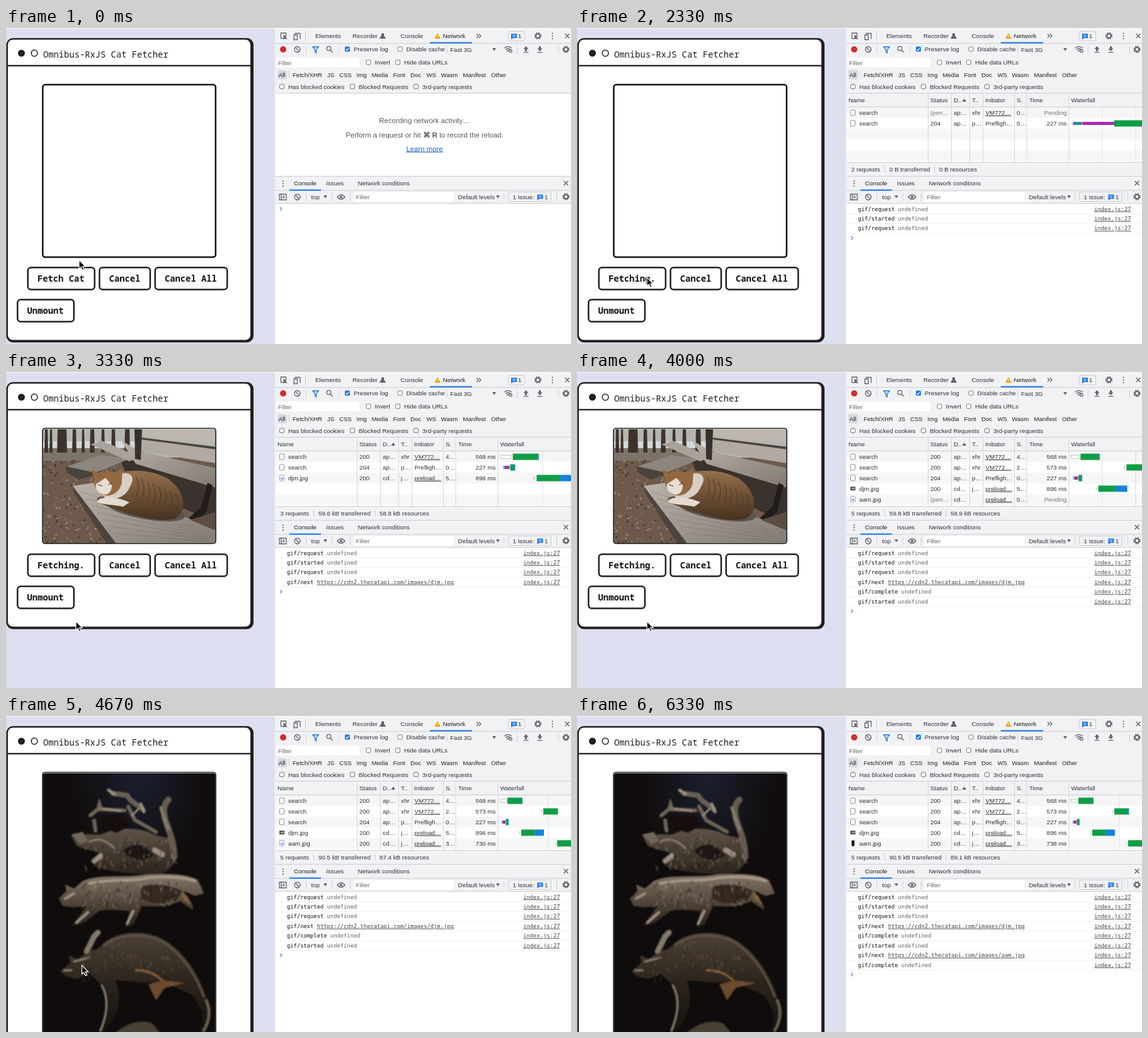
Write an HTML page that moves like this. It is 897x502 px and loops after 6.49 s.

```html
<!DOCTYPE html>
<html lang="en">
<head>
<meta charset="utf-8">
<title>Cat Fetcher</title>
<style>
html, body { margin: 0; width: 100%; height: 100%; overflow: hidden; background: #fff; }
svg { display: block; }
text { font-family: "Liberation Sans", Arial, sans-serif; font-size: 9.75px; fill: #303338; white-space: pre; }
.app { font-family: "Noto Sans Mono", "DejaVu Sans Mono", monospace; font-size: 13.8px; font-weight: 500; fill: #1d1d1d; }
.btn { font-weight: 700; fill: #111; }
.log { font-family: "DejaVu Sans Mono", monospace; font-size: 8.8px; fill: #111; }
.big { font-size: 11.4px; fill: #54575b; }
.ico { fill: none; stroke: #5f6368; stroke-width: 1.3; }
.u { text-decoration: underline; }
</style>
</head>
<body>
<svg id="stage" width="897" height="502" viewBox="0 0 897 502">
  <defs>
    <clipPath id="wide"><rect x="59" y="91" width="273" height="181" rx="3"/></clipPath>
    <clipPath id="tall"><rect x="59" y="91" width="273" height="420" rx="3"/></clipPath>
    <filter id="soft"><feGaussianBlur stdDeviation="1.1"/></filter>
    <filter id="glow"><feGaussianBlur stdDeviation="4"/></filter>
    <linearGradient id="wood" x1="0" y1="0" x2="1" y2="1"><stop stop-color="#b9b3ab"/><stop offset="1" stop-color="#817a73"/></linearGradient>
    <linearGradient id="coat" x1="0" y1="0" x2="0" y2="1"><stop stop-color="#94704c"/><stop offset="1" stop-color="#46311f"/></linearGradient>
    <linearGradient id="fur" x1="0" y1="0" x2="0" y2="1"><stop stop-color="#5f5447"/><stop offset="1" stop-color="#2c241d"/></linearGradient>
    <linearGradient id="lit" x1="0" y1="0" x2="0" y2="1"><stop stop-color="#85786a"/><stop offset=".5" stop-color="#54483c"/><stop offset="1" stop-color="#271f19"/></linearGradient>
    <linearGradient id="dim" x1="0" y1="0" x2="0" y2="1"><stop stop-color="#4d4237"/><stop offset=".5" stop-color="#2c241d"/><stop offset="1" stop-color="#17110d"/></linearGradient>
    <radialGradient id="night" cx=".55" cy=".02" r=".4"><stop stop-color="#1b1e2e"/><stop offset="1" stop-color="#100c0b"/></radialGradient>
  </defs>
  <g id="page"></g>
  <g id="tools"></g>
  <g id="net"></g>
  <g id="logs"></g>
  <g id="mouse"></g>
</svg>
<script>
const LOOP = 6490, FPS = 6;
const $ = id => document.getElementById(id);

const rect = (x, y, w, h, fill, more = '') =>
  `<rect x="${x}" y="${y}" width="${w}" height="${h}" fill="${fill}" ${more}/>`;
const path = (d, fill = 'none', more = '') => `<path d="${d}" fill="${fill}" ${more}/>`;
const line = (d, color, w) => path(d, 'none', `stroke="${color}" stroke-width="${w}" stroke-linecap="round"`);
const icon = d => `<path class="ico" d="${d}"/>`;
const disc = (x, y, r, fill, more = '') => `<circle cx="${x}" cy="${y}" r="${r}" fill="${fill}" ${more}/>`;
const oval = (x, y, rx, ry, fill, turn = 0) =>
  `<ellipse cx="${x}" cy="${y}" rx="${rx}" ry="${ry}" fill="${fill}" transform="rotate(${turn} ${x} ${y})"/>`;
// y is the vertical middle of the line
const text = (x, y, s, more = '') => `<text x="${x}" y="${y + 3.5}" ${more}>${s}</text>`;
const vline = (x, y, h, c = '#cbced3') => rect(x, y, 1, h, c);
const hline = (y, c = '#cbced3', x = 427) => rect(x, y, 897 - x, 1, c);

function random(seed) {
  return () => (seed = (seed * 16807) % 2147483647) / 2147483647;
}

// ---- pictures
function benchCat() {
  const rnd = random(41);
  let s = rect(58, 90, 276, 184, '#6d5a4c') + rect(58, 90, 276, 46, '#b5b6b0') +
    rect(58, 110, 160, 12, '#d3d8d8') + rect(58, 121, 160, 20, '#7d7469');
  for (const [x, w] of [[62, 4], [70, 3], [82, 14], [106, 5], [121, 3], [134, 6], [152, 4], [168, 5], [189, 7]])
    s += path(`M${x} 90h${w}l1 38h${-w - 2}z`, '#3d332c');
  for (let i = 0; i < 150; i++) {
    const x = 58 + rnd() * 120, y = 138 + rnd() * 135;
    s += oval(x.toFixed(1), y.toFixed(1), 2.4, 1.1, ['#a08a78', '#463930', '#8a7260'][i % 3], i * 37 % 180);
  }
  s += path('M180 136L334 170V240L276 214L190 160Z', '#3a322d') +
    path('M94 150L140 146L152 160L116 171L97 160Z', '#4a433e') +
    path('M96 150L150 132L196 138L142 160Z', '#8d867f') +
    path('M134 115L152 109L210 134L196 142Z', '#aaa39b') +
    path('M216 90H334V113L218 101Z', '#bdb7af') +
    path('M214 105L334 122V145L209 125Z', '#b0aaa2') +
    path('M182 108L212 126L334 153V184L206 146Z', 'url(#wood)') +
    path('M204 90L216 90L214 140L205 138Z', '#37302c') +
    path('M214 104L334 119V123L214 107Z', '#4b433e') +
    path('M320 176L328 180L318 222L300 240L286 236L310 214Z', '#211d1b') +
    path('M106 181L140 176L334 249V274H176Z', 'url(#wood)') +
    path('M106 182L176 274H160L108 192Z', '#4d443e') +
    path('M292 235L334 222V252Z', '#5b4d42');
  for (let i = 0; i < 7; i++)
    s += path(`M${118 + i * 9} ${190 + i * 11}L${300 + i * 4} ${246 + i * 4}`, 'none', 'stroke="#6f6861" stroke-width=".7" opacity=".6"');
  s += oval(222, 219, 63, 15, '#5c544d', 10) +
    path('M165 166C190 152 232 154 258 170C284 188 290 222 268 233C240 241 188 224 148 208C140 202 146 197 158 198Z', 'url(#coat)') +
    path('M178 162C196 158 208 164 196 184C190 198 174 204 158 202L152 190Z', '#d8cec1') +
    path('M144 206C150 196 176 198 196 207L186 214C170 210 154 212 144 206Z', '#e3dad0') +
    path('M135 154L146 160C156 156 166 157 172 160L185 153L184 172C184 188 170 198 158 196C146 194 138 182 140 170Z', '#94683f') +
    path('M158 168L168 180C168 192 160 197 153 194C144 191 141 184 143 178Z', '#e6ddd3') +
    path('M146 179l7 2M162 179l7-3', 'none', 'stroke="#3b2a1d"');
  for (let i = 0; i < 8; i++)
    s += path(`M${206 + i * 9} ${166 + i * 4}q8 14 0 ${34 - i}`, 'none', 'stroke="#473220" stroke-width="2" opacity=".45"');
  return `<g clip-path="url(#wide)">${s}</g>`;
}

function stackedCats() {
  const rnd = random(7), BLACK = '#120e0c', PALE = '#9c8f7f';
  // upper cat on its back: body, legs in the air, tail, head
  let s = path('M116 192C126 184 140 190 152 188C176 176 206 178 226 184C244 194 258 192 266 196C274 222 268 244 248 250C214 252 168 250 140 238C134 226 150 222 160 224C146 214 122 212 112 206L103 188Z', 'url(#fur)') +
    line('M258 133C248 142 249 156 256 174C262 190 267 204 267 224', '#655a4e', 10) +
    line('M246 146C249 156 253 168 258 180', '#857a6c', 5) +
    line('M170 123L192 126L198 134L217 148', '#6b6053', 8) + line('M163 118L172 124M214 140L219 152', PALE, 5) +
    line('M134 158L146 148L188 150M142 182L140 166M206 166L238 184M194 144L204 164', '#6f6456', 6) +
    line('M148 146L182 151M200 158L210 148', PALE, 3) +
    path('M146 160L188 158L198 174L176 186L148 176Z', BLACK) +
    path('M186 214C204 196 226 206 234 222C220 232 200 232 186 214Z', '#1f1813') +
    path('M148 130L154 148L144 146ZM104 188L122 184L130 198L118 204Z', '#71665a') +
    line('M236 213L248 220M140 230L150 222', PALE, 8) + line('M132 200C146 192 160 198 172 210', '#857969', 3);
  // middle cat, lit from above
  s += path('M84 290L96 278L94 268L108 274L122 262C150 250 190 258 220 252C260 250 284 250 304 260L310 272L314 282L300 286L282 278C288 290 300 300 296 308L276 294C262 302 240 304 216 302L202 332L190 336L196 310C176 308 160 306 148 310L122 330L104 334L116 318L128 302L106 304L90 302Z', 'url(#lit)') +
    line('M132 266C170 258 200 264 226 257C256 254 280 256 300 262', '#a59887', 4) +
    line('M94 290L108 282M112 328L130 312M192 330L202 310', PALE, 4) +
    path('M214 272C236 264 262 268 280 278L270 294C250 300 226 298 214 290Z', '#362c23') +
    path('M278 280l10 6l6 14l-12-8z', '#83603a');
  // lower cat, mostly in shadow
  s += line('M128 374L140 350L146 344', '#82776a', 9) +
    path('M86 406L102 392L100 380L114 386C126 374 140 376 152 364C172 342 224 336 258 360C286 380 306 410 318 444C330 466 328 488 314 502H304C320 484 310 462 296 444C278 434 258 428 248 420C222 428 196 420 174 420C186 452 178 476 156 502H146C162 470 160 444 148 424L134 410L112 418L96 414Z', 'url(#dim)') +
    line('M156 364C182 344 226 344 254 362C284 384 302 412 314 446', '#5f5345', 3) +
    line('M108 390L132 384M92 404L104 404M152 428C164 450 160 474 150 500', '#867a6b', 3) +
    line('M206 404C228 404 240 412 250 422', '#8a6038', 3) +
    path('M226 426L250 420L284 424L252 432L238 452Z', '#6b4b2f') +
    line('M318 452C326 470 322 486 314 500', '#6d6152', 4) +
    path('M166 510C184 492 208 480 232 488L250 510Z', '#4a4036');
  let hair = '';
  for (let i = 0; i < 260; i++) {
    const band = i % 3, u = rnd(), x = 122 + u * 150;
    const y = [192, 260, 356][band] + rnd() * [50, 40, 46][band] + (band === 2 ? 90 * (u - .45) ** 2 : 0);
    hair += path(`M${x.toFixed(1)} ${y.toFixed(1)}l${(rnd() * 8 - 4).toFixed(1)} 6`, 'none',
      `stroke="${i % 2 ? '#a39685' : BLACK}" stroke-width="1.8" opacity="${[.4, .45, .22][band]}"`);
  }
  return `<g clip-path="url(#tall)">${rect(58, 90, 276, 420, 'url(#night)')}<g filter="url(#soft)">${s}${hair}</g></g>`;
}

const pictures = ['', benchCat(), stackedCats()];

// ---- left side
const INK = '#231f20';
function button(x, y, w, s) {
  return rect(x, y, w, 35, '#fff', `rx="5" stroke="${INK}" stroke-width="2.5"`) +
    `<text class="app btn" x="${x + 15.3}" y="${y + 22}">${s}</text>`;
}

function drawPage(pic, busy) {
  const boxH = [274, 183, 470][pic], dy = boxH - 274;
  let s = rect(0, 0, 427, 502, '#dcdff0') + rect(0, 0, 427, 1, '#fff') +
    rect(.5, 16, 392.5, 483.5 + dy, INK, 'rx="11"') +
    rect(3, 18.5, 385, 477 + dy, '#fff', 'rx="8"') +
    rect(2, 58.7, 386, 2.3, INK) +
    disc(24.5, 40, 5.5, INK) + disc(45, 40, 5, '#fff', `stroke="${INK}" stroke-width="1.4"`) +
    `<text class="app" x="59" y="46.5">Omnibus-RxJS Cat Fetcher</text>`;
  s += pic
    ? rect(58, 89.5, 275, boxH, '#fff', 'rx="4" stroke="#111" stroke-width="1.6"') + pictures[pic]
    : rect(58.3, 90, 274.5, boxH, '#fff', 'rx="4" stroke="#111" stroke-width="2.5"');
  if (pic < 2) {
    const y = 380.5 + dy;
    s += button(34.7, y, 106, busy ? 'Fetching.' : 'Fetch Cat') + button(148.4, y, 80.5, 'Cancel') +
      button(236.7, y, 114.5, 'Cancel All') + button(18.3, y + 51, 89.5, 'Unmount');
  }
  return s;
}

// ---- devtools chrome
const box = (x, y, on) => on
  ? rect(x - 4, y - 4, 8, 8, '#1a73e8', 'rx="1.5"') + path(`M${x - 2.3} ${y}l1.7 2l3-4`, 'none', 'stroke="#fff" stroke-width="1.2"')
  : rect(x - 3.5, y - 3.5, 7, 7, '#fff', 'rx="1.5" stroke="#767676" stroke-width="1"');
const check = (x, y, s, on) => box(x, y, on) + text(x + 10, y, s);
const gear = (x, y) => disc(x, y, 3.3, 'none', 'stroke="#5f6368" stroke-width="2"') +
  disc(x, y, 4.9, 'none', 'stroke="#5f6368" stroke-width="1.6" stroke-dasharray="2.1 1.75"');
const cross = (x, y) => icon(`M${x - 3.5} ${y - 3.5}l7 7m0-7l-7 7`);
const dots = (x, y) => [-4, 0, 4].map(d => disc(x, y + d, 1.1, '#5f6368')).join('');
const ban = (x, y) => disc(x, y, 4.5, 'none', 'stroke="#5f6368" stroke-width="1.3"') + icon(`M${x - 3} ${y - 3}l6 6`);
const bubble = (x, y) => path(`M${x - 4.5} ${y - 4}h9v7h-6l-3 2.5z`, '#1a73e8') +
  path(`M${x - 2.5} ${y - 1.8}h5m-5 2.4h5`, 'none', 'stroke="#fff" stroke-width=".9"');
const drop = (x, y) => path(`M${x - 3} ${y - 2}h6l-3 4.6z`, '#5f6368');
const field = (x, y, w) => rect(x, y, w, 15.5, '#fff') + text(x + 3, y + 8, 'Filter', 'style="fill:#62666a"');
const frame = (x, y, w, h) => rect(x, y, w, h, 'none', 'rx="2" stroke="#cbced3"');

function drawTools() {
  const BAR = '#f0f2f4';
  let s = rect(426.5, 0, 470.5, 502, '#fff') + rect(427, 1, 470, 103, BAR) + hline(24) + hline(103) +
    icon('M444 16.5h-7.5v-8.5h8v4') + path('M440 11l6.5 2.5l-2.8 1l2.6 2.6l-1.2 1.2l-2.6-2.6l-1.1 2.6z', '#5f6368') +
    icon('M459 8.5h8v9M457 11h5.5v7.5h-5.5zM459 11v-2.5') + vline(475, 6, 14) +
    text(491, 12.5, 'Elements') + text(550, 12.5, 'Recorder') + text(626.5, 12.5, 'Console') + text(693.5, 12.5, 'Network', 'style="fill:#202124"') +
    path('M596 8.5h4v3l3 5.5h-10l3-5.5z', '#5f6368') +
    path('M685 8.5l4.8 8.5h-9.6z', '#f2a600') + rect(684.6, 11.5, 1, 3, '#fff') +
    rect(673, 22.5, 67, 2, '#1a73e8') +
    icon('M747 9.5l3 3l-3 3m4-6l3 3l-3 3') +
    frame(797.5, 5.5, 26, 15) + bubble(806.5, 13) + text(813, 12.5, '1') +
    gear(844.5, 12.5) + dots(867.5, 12.5) + cross(891, 12.5);

  s += disc(440, 34, 5, '#d32f2f') + ban(462.5, 34) + vline(476, 28, 13) +
    path('M487 30h9l-3.5 4.5v5l-2-1.5v-3.5z', 'none', 'stroke="#1a73e8" stroke-width="1.3"') +
    disc(512.5, 32.5, 3.3, 'none', 'stroke="#5f6368" stroke-width="1.3"') + icon('M515 35l4 4') + vline(528, 28, 13) +
    check(542, 33.5, 'Preserve log', true) + check(625.5, 33.5, 'Disable cache') + vline(699.5, 28, 13) +
    text(705, 34, 'Fast 3G') + drop(775, 34) +
    icon('M791 32q6-5 12 0m-10 2.5q4-3.5 8 0m-6 2.5q2-2 3 0') + disc(801, 36.5, 2.2, BAR, 'stroke="#5f6368" stroke-width="1.3"') + vline(811, 28, 13) +
    path('M825.5 29l4 4.5h-2.5v3.5h-3v-3.5h-2.5zM821.5 38h8v1.2h-8z', '#5f6368') +
    path('M847.5 37l4-4.5h-2.5v-3.5h-3v3.5h-2.5zM843.5 38h8v1.2h-8z', '#5f6368') + vline(877, 28, 13) + gear(889, 34);

  s += field(429, 47, 132) + check(575.5, 54.5, 'Invert') + check(622, 54.5, 'Hide data URLs');
  s += rect(431, 67, 15, 14.5, '#d5d8dc', 'rx="3"') + vline(449, 68, 12);
  const kinds = { All: 432.5, 'Fetch/XHR': 455, JS: 510, CSS: 529, Img: 556.5, Media: 580.5, Font: 614.5, Doc: 642, WS: 667.5, Wasm: 690.5, Manifest: 725.5, Other: 770 };
  for (const k in kinds) s += text(kinds[k], 74, k, 'style="font-size:9.6px;fill:#202124"');
  s += check(438, 93, 'Has blocked cookies') + check(550, 93, 'Blocked Requests') + check(651, 93, '3rd-party requests');

  s += rect(427, 235, 470, 43, BAR) + hline(235) + hline(257.5) + hline(278) +
    dots(440, 247) + text(457, 246.5, 'Console', 'style="fill:#202124"') + rect(450, 256.5, 50, 2, '#1a73e8') +
    text(508, 246.5, 'Issues') + text(558.5, 246.5, 'Network conditions') + cross(889, 246.5) +
    icon('M434 264h11v9h-11zM437 264v9') + path('M439.5 266l3.5 2.5l-3.5 2.5z', '#5f6368') + ban(462.5, 268.5) + vline(476, 262, 13) +
    text(484.5, 268, 'top') + drop(507, 268) + vline(517, 262, 13) +
    icon('M526 268.5q6-7 12 0q-6 7-12 0z') + disc(532, 268.5, 2, '#5f6368') + vline(546, 262, 13) +
    field(552.5, 260.5, 158) + text(717.5, 268, 'Default levels') + drop(781, 268) + vline(790, 262, 13) +
    frame(797.5, 260.5, 68, 15) + text(804.5, 268, '1 Issue:') + bubble(848, 268.5) + text(855, 268, '1') +
    vline(874, 262, 13) + gear(889, 268) + vline(426.5, 1, 501, '#e2e4e9');
  return s;
}

// ---- network table
const COLS = [557, 594, 623, 644, 694, 713.5, 780.5];
const TEAL = '#2a8f8f', GREEN = '#0f9d45', BLUE = '#1583d8', PURPLE = '#a52bb5', GREY = '#c4c4c4';
const zoomKeys = [[15, 3.6], [17, 2.4], [20, 1.72], [24, 1.28], [28, 1]];

function zoom(n) {
  if (n >= 28) return 1;
  for (let i = 1; i < zoomKeys.length; i++) {
    const [a, p] = zoomKeys[i - 1], [b, q] = zoomKeys[i];
    if (n <= b) return p + (q - p) * Math.max(0, n - a) / (b - a);
  }
}

// bar segments: from, to, colour, height
const bars = {
  first: [[0, 11, 'wait', 5], [12, 35, GREEN, 10], [35, 36, BLUE, 10]],
  second: [[66, 67.2, GREY, 5], [69, 91, GREEN, 10], [91, 92.4, BLUE, 10]],
  check: [[2.6, 3.4, GREY, 5], [3.6, 4.4, TEAL, 5], [4.4, 9, PURPLE, 5], [9.6, 13.4, GREEN, 10], [13.4, 14.2, BLUE, 10]],
  djm: [[31, 32.2, GREY, 5], [34, 55.3, GREEN, 10], [55.3, 70, BLUE, 10]],
  aam: [[88, 89.2, GREY, 5], [91, 116, GREEN, 10]],
  early: [[1.4, 2.4, GREY, 5], [3.5, 17, TEAL, 5], [17, 18.5, '#e08a1e', 5], [18.5, 69, PURPLE, 5], [69, 114, GREEN, 10]]
};
const drawBars = (name, y, k) => (bars[name] || []).map(([a, b, c, h]) => {
  const x = 784 + a * k, w = Math.min(897, 784 + b * k) - x;
  if (w <= 0) return '';
  return c === 'wait' ? rect(x + .5, y - 2.5, w - 1, h, '#fff', 'stroke="#c8c8c8"') : rect(x, y - h / 2, w, h, c);
}).join('');

function fileIcon(kind, y) {
  if (kind === 'djm') return rect(434, y - 3, 8, 6, '#5a5048') + rect(436, y - 1, 5, 2, '#b3a696');
  if (kind === 'aam') return rect(436, y - 4.5, 4.5, 9, '#17120f');
  const img = kind === 'img';
  return rect(434.5, y - 4.5, 7, 9, '#fff', `rx="1" stroke="${img ? '#9aa4c8' : '#8b8f94'}"`) +
    (img ? rect(436, y - .5, 4, 3, '#8aa0d8') : '');
}

// each row: icon, name, status, domain, type, initiator, size, time, bar
function rowsAt(n) {
  const pending = (ico, name, domain, type, init) => [ico, name, '(pen…', domain, type, init, '0…', 'Pending', ''];
  const search = ['doc', 'search', 'ap…', 'xhr', 'VM772…'];
  const rows = [n < 15 ? pending(...search)
    : ['doc', 'search', 200, 'ap…', 'xhr', 'VM772…', '4…', '568 ms', 'first']];
  if (n >= 21) rows.push(n < 24 ? pending(...search)
    : ['doc', 'search', 200, 'ap…', 'xhr', 'VM772…', '2…', '573 ms', 'second']);
  rows.push(n < 12 ? pending('doc', 'search', 'ap…', 'p…', 'Prefligh…')
    : ['doc', 'search', 204, 'ap…', 'p…', 'Prefligh…', '0…', '227 ms', n < 15 ? 'early' : 'check']);
  if (n >= 15) rows.push(n < 20 ? pending('img', 'djm.jpg', 'cd…', '', 'preload…')
    : [n < 21 ? 'img' : 'djm', 'djm.jpg', 200, 'cd…', 'j…', 'preload…', '5…', '896 ms', 'djm']);
  if (n >= 24) rows.push(n < 28 ? pending('img', 'aam.jpg', 'cd…', '', 'preload…')
    : [n < 29 ? 'img' : 'aam', 'aam.jpg', 200, 'cd…', 'j…', 'preload…', '3…', n < 29 ? '730 ms' : '738 ms', 'aam']);
  return rows;
}

function totals(n) {
  if (n < 15) return [2, '0 B', '0 B'];
  if (n < 20) return [3, '695 B', '53 B'];
  if (n < 24) return [n < 21 ? 3 : 4, '59.6 kB', '58.8 kB'];
  if (n < 28) return [5, '59.8 kB', '58.9 kB'];
  return [5, '90.5 kB', n < 29 ? '87.4 kB' : '89.1 kB'];
}

function drawNet(n) {
  if (n < 10) {
    const mid = 'class="big" text-anchor="middle"';
    return text(664.5, 147.5, 'Recording network activity…', mid) +
      text(664.5, 170, 'Perform a request or hit <tspan font-weight="bold">⌘ R</tspan> to record the reload.', mid) +
      text(664.5, 192, 'Learn more', 'class="big u" text-anchor="middle" style="fill:#1a66d6"');
  }
  let s = rect(428, 104, 469, 21, '#f0f2f4') + hline(125, '#cbced3', 428);
  for (let i = 0; i < 5; i += 2) s += rect(428, 126 + 17 * i, 469, 17, '#f5f6f6');
  const ticks = n < 15 || (n > 20 && n < 28) ? [834, 887] : [n < 21 ? 852 : 861];
  ticks.forEach(x => s += vline(x - .5, 126, 87, n > 20 && n < 28 && x === 887 ? '#ecc9cb' : '#e0e2e4'));
  COLS.forEach(x => s += vline(x, 104, 109, '#d3d6d9'));
  [[431, 'Name'], [561, 'Status'], [598, 'D..'], [627, 'T..'], [648, 'Initiator'], [698, 'S.'], [718, 'Time'], [784.5, 'Waterfall']]
    .forEach(([x, t]) => s += text(x, 114.5, t));
  s += path('M611.5 117h6.5l-3.25-5z', '#5f6368');
  const k = n < 15 ? 1 : zoom(n);
  rowsAt(n).forEach(([ico, name, status, domain, type, init, size, time, bar], i) => {
    const y = 134.5 + 16.9 * i, grey = time === 'Pending' ? 'style="fill:#777"' : '';
    s += fileIcon(ico, y) + text(448, y, name) + text(561, y, status, grey) +
      text(598, y, domain) + text(627, y, type) + text(648.5, y, init, init.startsWith('Pre') ? '' : 'class="u"') +
      text(698, y, size) + text(777.5, y, time, 'text-anchor="end" ' + grey) + drawBars(bar, y + .2, k);
  });
  const [count, sent, res] = totals(n);
  const resX = n < 15 ? 575 : n < 20 ? 585 : 593;
  return s + rect(428, 213, 469, 22, '#f0f2f4') + hline(213, '#cbced3', 428) +
    text(435.5, 224.5, count + ' requests') + vline(488, 219, 11) + text(496, 224.5, sent + ' transferred') +
    vline(resX - 7.5, 219, 11) + text(resX, 224.5, res + ' resources');
}

// ---- console
const url = s => `https://cdn2.thecatapi.com/images/${s}.jpg`;
const entries = [['request'], ['started'], ['request'], ['next', url('djm')], ['complete'], ['started'], ['next', url('aam')], ['complete']];
const logCount = n => n < 10 ? 0 : n < 12 ? 2 : n < 20 ? 3 : n < 21 ? 4 : n < 29 ? 6 : 8;

function drawLogs(n) {
  const count = logCount(n), at = i => 287.3 + 15.43 * i;
  let s = '';
  entries.slice(0, count).forEach(([what, link], i) => {
    const value = link ? `<tspan class="u" fill="#444">${link}</tspan>` : '<tspan fill="#636363">undefined</tspan>';
    s += text(446, at(i) - .3, `gif/${what} ${value}`, 'class="log"') +
      text(879.5, at(i) - .3, 'index.js:27', 'class="log u" text-anchor="end" style="fill:#444"') +
      hline(at(i) + 7.5, '#f0f0f0', 428);
  });
  return s + path(`M435 ${at(count) - 2.6}l3 2.6l-3 2.6`, 'none', 'stroke="#4a86e0" stroke-width="1.2"');
}

// ---- pointer
const ease = u => { u = Math.min(1, Math.max(0, u)); return u * u * (3 - 2 * u); };
function drawMouse(n) {
  const press = ease((n - 1) / 5), slide = ease((n - 26) / 2), leave = ease((n - 28) / 5);
  const x = 116 - 5 * press + 9.5 * slide + 40 * leave, y = 368.5 + 27.5 * press + 114 * leave;
  const ring = n === 9 || n === 11
    ? disc(110, 397, 21.3, 'rgba(255,255,255,.3)', 'stroke="#fff" stroke-width="3.6"') + disc(110, 397, 21.3, 'none', 'stroke="#111" stroke-width="1.5"') : '';
  return ring + path('M0 0V14L3.2 11.2L5.6 16.5L8 15.4L5.6 10.3H10Z', '#000',
    `stroke="#fff" stroke-width="1.2" transform="translate(${x} ${y})"`);
}

$('tools').innerHTML = drawTools();
let shown = -1, shownPage = '';
function draw(ms) {
  const n = Math.min(38, Math.floor((ms % LOOP) * FPS / 1000 + .03));
  if (n === shown) return;
  shown = n;
  const pic = n < 20 ? 0 : n < 28 ? 1 : 2, busy = n >= 10, key = pic + '' + busy;
  if (key !== shownPage) $('page').innerHTML = drawPage(pic, busy);
  shownPage = key;
  $('net').innerHTML = drawNet(n);
  $('logs').innerHTML = drawLogs(n);
  $('mouse').innerHTML = drawMouse(n);
}

const start = performance.now();
function tick() {
  draw(performance.now() - start);
  requestAnimationFrame(tick);
}
tick();
</script>
</body>
</html>
```
